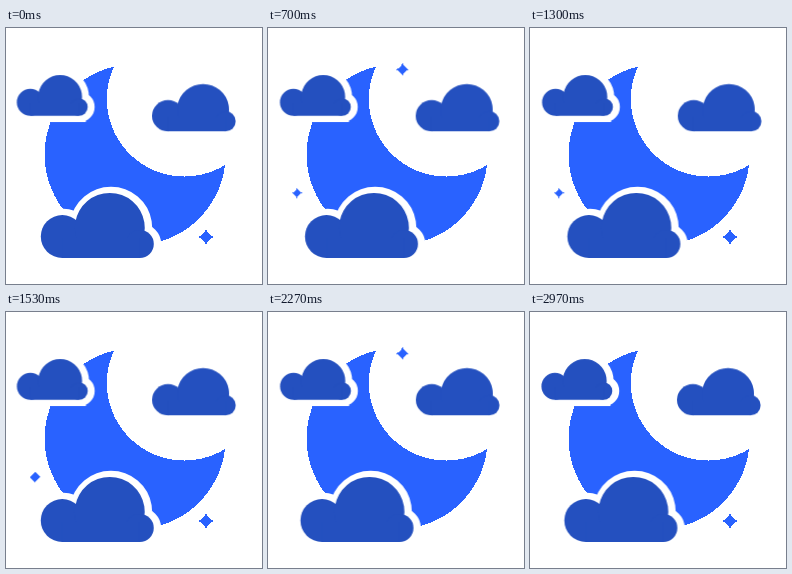
Write an HTML page that moves like this. It is 256 px wide and 256 px high and loops after 3010 ms.

```html
<!DOCTYPE html>
<html lang="en">
<head>
<meta charset="utf-8">
<title>Moon and clouds</title>
<style>
  html, body { margin: 0; width: 100%; height: 100%; overflow: hidden; background: #fff; }
  svg { display: block; width: 100vw; height: 100vh; }

  .moon, .star { fill: #2962ff; shape-rendering: crispEdges; }
  .cloud { fill: #2450bf; }
  .halo { fill: #fff; stroke: #fff; stroke-width: 12.4px; }
  #cloud * { vector-effect: non-scaling-stroke; }

  .drift { animation: 1505ms linear infinite; }
  .left { animation-name: drift-left; }
  .right { animation-name: drift-right; }
  .front { animation-name: drift-front; animation-duration: 3010ms; }
  @keyframes drift-left {
    60% { transform: translateX(1.5px); animation-timing-function: cubic-bezier(.8, 0, 1, .5); }
  }
  @keyframes drift-right {
    60% { transform: translateX(2.2px); animation-timing-function: cubic-bezier(.8, 0, 1, .5); }
  }
  @keyframes drift-front {
    0%, 50%, 100% { transform: translateX(0); }
    40% { transform: translateX(3.7px); }
    90% { transform: translateX(-3.7px); }
  }

  .star { animation: 1505ms ease-in-out infinite; }
  .top { animation-name: twinkle-top; }
  .low { animation-name: twinkle-low; }
  .side { animation-name: twinkle-side, fatten; animation-duration: 3010ms; }
  @keyframes twinkle-top {
    0%, 25.5%, 79.5%, 100% { transform: scale(0); }
    37%, 71.5% { transform: scale(1); }
  }
  @keyframes twinkle-low {
    0%, 3%, 70%, 100% { transform: scale(1); }
    23%, 52% { transform: scale(0); }
  }
  @keyframes twinkle-side {
    0%, 8%, 60%, 80%, 97.5%, 100% { transform: scale(0); }
    12%, 51% { transform: scale(.85); }
    88%, 92% { transform: scale(1); }
  }
  /* the side star swells to a diamond before it fades */
  @keyframes fatten {
    0%, 42%, 62%, 100% { d: path("M0-8.4Q2.1-2.1 8.4 0Q2.1 2.1 0 8.4Q-2.1 2.1-8.4 0Q-2.1-2.1 0-8.4Z"); }
    50%, 55% { d: path("M0-8.4Q4.2-4.2 8.4 0Q4.2 4.2 0 8.4Q-4.2 4.2-8.4 0Q-4.2-4.2 0-8.4Z"); }
  }
</style>
</head>
<body>
<svg viewBox="0 0 256 256">
  <defs>
    <g id="cloud">
      <circle cx="21.5" cy="43.5" r="21.5"/>
      <path d="M39 53A35 35 0 1 1 99 53Z"/>
      <circle cx="99" cy="51" r="14"/>
      <rect x="21.5" y="45" width="77.5" height="20"/>
    </g>
    <path id="star" d="M0-8.4Q2.1-2.1 8.4 0Q2.1 2.1 0 8.4Q-2.1 2.1-8.4 0Q-2.1-2.1 0-8.4Z"/>
  </defs>

  <path class="moon" d="M108 38.5A90.5 90.5 0 1 0 219 137A77.5 77.5 0 0 1 108 38.5Z"/>

  <g transform="translate(134.5 41.5) scale(.8)"><use class="star top" href="#star"/></g>
  <g transform="translate(29 165) scale(.75)">
    <path class="star side" d="M0-8.4Q2.1-2.1 8.4 0Q2.1 2.1 0 8.4Q-2.1 2.1-8.4 0Q-2.1-2.1 0-8.4Z"/>
  </g>
  <g transform="translate(200 209)"><use class="star low" href="#star"/></g>

  <g class="drift left"><g transform="translate(10.8 47) scale(.627)">
    <use class="halo" href="#cloud" x="1.2"/><use class="cloud" href="#cloud"/>
  </g></g>
  <g class="drift right"><g transform="translate(146 56) scale(.74 .73)">
    <use class="cloud" href="#cloud"/>
  </g></g>
  <g class="drift front"><g transform="translate(34.8 165)">
    <use class="halo" href="#cloud" x="1.2"/><use class="cloud" href="#cloud"/>
  </g></g>
</svg>
</body>
</html>
```
